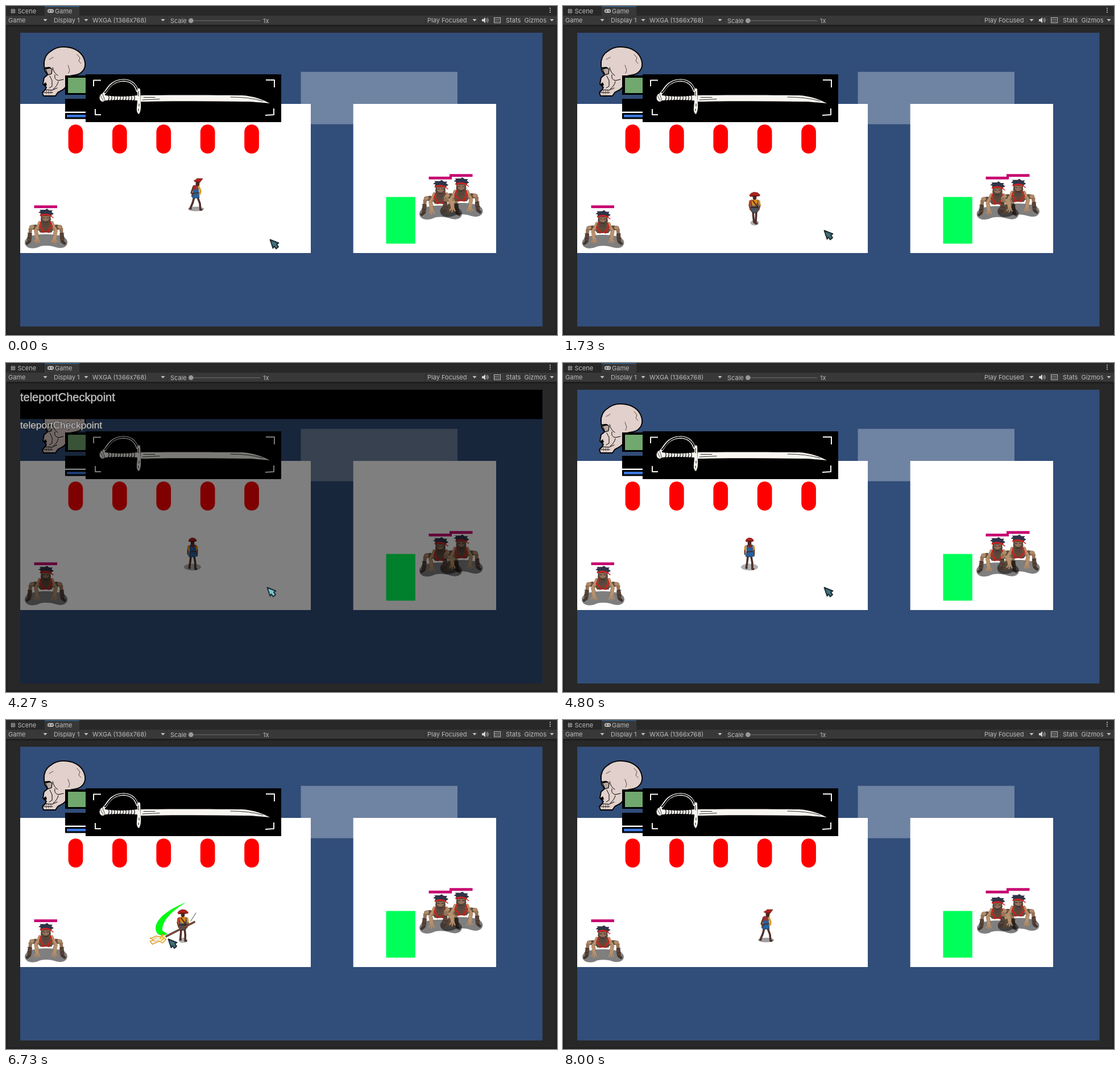
Animation, 969 px wide and 578 px high, one loop 8.07 s. Source, as an HTML page:

```html
<!DOCTYPE html>
<html lang="en">
<head>
<meta charset="utf-8">
<title>Game view</title>
<style>
html, body { margin: 0; width: 100%; height: 100%; overflow: hidden; background: #282828; }
svg { display: block; width: 969px; height: 578px; }
.ui { font: 11px Inter, sans-serif; fill: #bcbcbc; }
.console { font: 17.3px "Liberation Sans", Arial, sans-serif; fill: #c8c8c8; stroke: #3a3a3a; stroke-width: 1.4px; paint-order: stroke; }
#input { font-size: 20px; }
.line { fill: none; stroke-linecap: round; stroke-linejoin: round; }
</style>
</head>
<body>
<svg id="stage" viewBox="0 0 969 578" xmlns="http://www.w3.org/2000/svg"></svg>
<script>
const LOOP = 8070, STEP = 200 / 3;
const OPEN = 37, CLOSE = 72;
const COMMANDS = ['acquire', 'disableur', 'flipswitch', 'health', 'hudfade', 'inventory', 'invincible',
  'openshop', 'rechargegun', 'rechargestamina', 'teleportCheckpoint', 'changescene', 'clearachievements',
  'help', 'log', 'settimescale', 'unlockachievement'];

const rect = (x, y, w, h, fill, more = '') =>
  `<rect x="${x}" y="${y}" width="${w}" height="${h}" fill="${fill}" ${more}/>`;
const shape = (d, fill, more = '') => `<path d="${d}" fill="${fill}" ${more}/>`;
const line = (d, color, width = 1, more = '') =>
  `<path class="line" d="${d}" stroke="${color}" stroke-width="${width}" ${more}/>`;
const oval = (x, y, rx, ry, fill, more = '') =>
  `<ellipse cx="${x}" cy="${y}" rx="${rx}" ry="${ry}" fill="${fill}" ${more}/>`;
const label = (x, y, text) => `<text class="ui" x="${x}" y="${y}">${text}</text>`;
const range = (n, f) => Array.from({ length: n }, (_, i) => f(i)).join('');

function editor() {
  const arrows = [69, 141, 276, 824, 960].map(x => shape(`M${x - 3.5} 23h7l-3.5 4z`, '#c4c4c4')).join('');
  const dividers = [76.5, 148.5, 283.5, 737.5, 831.5, 854.5, 876.5, 907.5]
    .map(x => rect(x - .5, 17, 1, 16, '#303030')).join('');
  return rect(0, 0, 969, 578, '#282828') +
    rect(68, 0, 61, 17, '#383838') + rect(68, 0, 61, 1.5, '#2c5d87') +
    rect(0, 17, 969, 16, '#383838') + rect(0, 33, 969, 1.2, '#1d1d1d') + dividers +
    line('M10.5 5v8M14 5v8M8.5 7.3h8M8.5 10.7h8', '#bcbcbc') +
    rect(73, 5.5, 11, 6.5, '#c4c4c4', 'rx="3.2"') + line('M74.8 8.8h3M76.3 7.3v3', '#383838') + oval(81, 8.8, 1.2, 1.2, '#383838') +
    label(20.5, 12.5, 'Scene') + label(86, 12.5, 'Game') +
    label(4, 29, 'Game') + label(84, 29, 'Display 1') + label(152, 29, 'WXGA (1366x768)') +
    label(289, 29.5, 'Scale') + label(452, 29.5, '1x') + label(741, 29, 'Play Focused') +
    label(879, 29, 'Stats') + label(911.5, 29, 'Gizmos') + arrows +
    rect(321, 25, 126, 1.5, '#5e5e5e') + oval(325.3, 25.8, 4.3, 4.3, '#999') +
    shape('M837 23h2.5l3.5-3v10l-3.5-3H837z', '#d2d2d2') + line('M845 22.5q2 2.5 0 5M846.5 21q3.5 4 0 8', '#c4c4c4') +
    rect(858.5, 20.5, 11, 9, 'none', 'stroke="#bcbcbc"') + line('M860 23.5h9M860 26.5h9', '#c4c4c4', 1.2, 'stroke-dasharray="1 2"') +
    range(3, i => rect(956, 3 + i * 3.5, 1.8, 1.8, '#c4c4c4')) +
    rect(1, 35, 967, 542, 'none', 'stroke="#1c1c1c" stroke-width="3" opacity=".6"');
}

function skull() {
  return shape('M67 104C66 95 70 85 78 80C85 74 95 71 105 72C122 73 134 82 138 95C141 105 138 112 132 117C126 122 118 121 112 123C106 125 107 132 105 142C102 148 95 149 91 152L87 158H66L64 152L69 147L71 143L65 137L67 126L73 121L68 113Z',
      '#e1d0cb', 'stroke="#000" stroke-width="1.8" stroke-linejoin="round"') +
    shape('M69 110l7-2 5 3-1 8-6 2z', '#b9a7a2', 'stroke="#000" stroke-width="1.2"') + shape('M67 108l9-1 4 2-9 2zM66 137l4-3 2 5-3 2z', '#000') +
    line('M82 108q2 10 9 14M77 123l4 8v10l-5 3M86 121q-2 8 6 10l9-2M92 133q-2 8-9 13M69 147l12 1 9-4M66 152h16', '#000', 1) +
    line('M109 104l3 9-2 5M125 85l5 6-2 6 4 4M83 90l-7 4', '#4a3f3d', .9) +
    line('M71 147v8M75 147v8M79 147v7', '#4a3f3d', .8);
}

function sword() {
  const white = '#f8f5f0';
  return rect(140, 120, 344, 84, '#000') +
    line('M154 141V130.5H167M457 130H472V143M157 181V191H167M456 192L471 191V180', white, 2, 'style="stroke-linecap:butt"') +
    line('M172 154C178 150 182 131 207 130.5C222 131 228 139 231 149', white, 4.4) +
    line('M174 152C180 148 184 131 207 130.5C221 131 228 139 231 148', '#000', 2.2, 'stroke-dasharray="2 1.6"') +
    oval(170, 161, 5.5, 7, white) + line('M166 157l5 9M170 155l4 11', '#000', .7) +
    shape('M174 157Q203 161 231 157V166Q203 164 174 166Z', white) +
    range(10, i => line(`M${180 + i * 5} 157q3 5-1 10`, '#000', 1.2)) +
    shape('M231 146q3-3 5 0l1 26q1 11-3 18q-5-2-4-12l1-10z', white) + line('M233 150v8M234 172v4M233 181v3', '#000', 1) +
    shape('M237 157C300 156 370 156.5 415 157C434 158 451 164 464 171C450 170 438 168 420 168C360 167 300 167 237 168Z', white) +
    line('M240 165L270 163.5M242 160.5h20M395 160Q428 160 452 167', '#000', .8);
}

function hud() {
  return skull() + rect(104, 122, 40, 34, '#000') + rect(109, 126, 33, 27, '#70a86e') +
    rect(104, 163, 40, 22.5, '#000') + rect(104, 188, 40, 10.5, '#000') + rect(107, 191, 34, 4.5, '#3c78e0') +
    sword() + range(5, i => rect(109.6 + i * 77.4, 208.3, 25.7, 51, '#f00', 'rx="12.8"'));
}

// Crouching enemy, standing on y = 0
function enemyBody() {
  const half = line('M8-34L18-38L25-37', '#65503f', 8) + line('M24-38L27-34', '#b08d6c', 7) +
    line('M27-33L28-24', '#957459', 6) + line('M28-24L29-15', '#59443a', 7.5) + line('M29-12L33-9', '#46362e', 5) +
    line('M25-26l7-1M26-18l7-1', '#3b302a', 1) + line('M14-33l9-1', '#4a3a30', 1) +
    line('M11-42L18-31L15-16', '#b8916d', 6) + line('M9-41L15-33L12-20', '#8a6a50', 1) +
    line('M13-16l-2 5M15-16l1 6M17-16l3 4', '#b08a68', 2.4);
  return shape('M-37-11C-36-20-24-25 0-25C24-25 38-20 38-11C38-2 28 1 18-2C8-6-8-6-14-2C-25 2-37-1-37-11Z', '#000', 'opacity=".5"') +
    shape('M-12-46L12-46L15-36L10-28H-10L-15-36Z', '#5f493c') +
    half + `<g transform="scale(-1 1)">${half}</g>` +
    line('M-11-46L-13-41M11-46L13-41', '#b8916d', 5) + line('M-8-47L-11-38L-5-33M8-47L11-38L5-33', '#c4251f', 2.6) +
    shape('M-8-33L0-30L8-33L6-27L0-29L-6-27Z', '#b3251f') +
    shape('M-8-60H8L9-50L5-41L0-38L-5-41L-9-50Z', '#57453b') + shape('M-6-57H6L6-51L2-48H-2L-6-51Z', '#92705a') +
    line('M-5-54h3M2-54h3M-3-46h6', '#352a27', 1.2) +
    shape('M-10-58L-9-62L-13-63L-9-66L-11-68L-1-68L2-70L6-67L12-67L10-64L14-61L9-58Z', '#2f3448') +
    line('M-9-58Q0-62 9-57.5', '#d0251f', 2.8) + line('M9-57l4 3', '#d0251f', 1.5);
}

function enemy(x, y) {
  return rect(x - 20.5, y - 75.7, 40.5, 4.8, '#c70070') + `<g class="enemy" data-x="${x}" data-y="${y}">${enemyBody()}</g>`;
}

const hat = shape('M-7 5L-5 2L-1 0L4 1L7 4L7 6L-6 7Z', '#b3201a', 'stroke="#5a1a15" stroke-width=".6"') + line('M-4 6H5', '#5c1914', 1.4);
const sideHat = shape('M-7 4L-3 2L-1 0L9 0L7 3L4 7L-4 6Z', '#b3201a', 'stroke="#5a1a15" stroke-width=".6"') + line('M-3 6H4', '#5c1914', 1.2);
const head = oval(0, 9, 3.4, 4.5, '#4a2922');
const legs = '<path class="line legs" stroke="#50302a" stroke-width="3.6"/>';
const POSES = {
  side: oval(0, 53.5, 14, 4, '#a0a0a0') + legs +
    shape('M-4 12L4 12L5 24L6 34L-5 35L-8 31L-5 24Z', '#28629b', 'stroke="#29282d" stroke-width=".6"') +
    shape('M-6 13L2 11L1 20L-5 19Z', '#ad2923') + line('M5 14L8 22L7 27', '#e59a22', 3.4) + line('M-5 16L-8 25L-5 29', '#65372b', 3) +
    line('M-5 26L5 25', '#4b2a21', 1.6) + `<g transform="translate(3 0)">${head}${sideHat}</g>`,
  front: oval(0, 54, 7.5, 4.5, '#b0b0b0') + legs +
    shape('M-7 14L7 14L6 34L0 37L-6 34Z', '#4a5566', 'stroke="#3b2420" stroke-width=".8"') +
    shape('M-6 13L6 13L3 24L-4 24Z', '#d9861f') + line('M-8 16L-9 23', '#c4431f', 3.4) + line('M8 16L9 23', '#d99428', 3.4) +
    line('M-9 24L-7 31M9 24L7 31', '#71402d', 2.8) + line('M-6 27H6M-3 15L5 26', '#3f241d', 1.8) + head +
    `<g transform="scale(1.3 1.1)">${hat}</g>`,
  back: oval(0, 51.5, 15, 6, '#b0b0b0') + legs +
    shape('M-5 13L6 13L6 24L9 32L3 34L-7 33L-5 24Z', '#275e9b', 'stroke="#252a33" stroke-width=".6"') +
    line('M-7 15L-8 22M7 15L8 21', '#d98a21', 3.4) + line('M-8 23L-8 29M8 22L8 29', '#66392a', 2.6) +
    shape('M-4 12L5 12L3 17L-2 17Z', '#7d2d2b') + line('M-5 25L6 24', '#3e2820', 1.6) + head + hat,
  attack: shape('M-1-9L9 0L5 8H-7L-9-2Z', '#c3c3c3') + oval(0, 59, 4.5, 7, '#bdbdbd') + legs +
    shape('M-9 12L9 12L9 33L0 36L-9 33Z', '#285b8a', 'stroke="#29262b" stroke-width="1"') +
    line('M-8 14L-9 25M8 13L10 18', '#b12a20', 5) + line('M-9 26L-6 32M10 18L13 8', '#6c3c2b', 3.5) +
    shape('M-7 12H7L3 21L-4 20Z', '#a92920') + line('M-8 27H8M-6 16L6 27', '#3f251e', 2) + head + hat
};

const axe = '<g stroke="#d98a10" stroke-width="1.2">' +
  shape('M-13-3L-6-8L-1-4L12-7L15-1L8 0L14 4L2 6L-4 3L-10 8L-8 2Z', '#fbf1cf') + '</g>' +
  line('M-11 1L-5-3M-8 5L-3 0', '#f4bd22', 2) + line('M0-2L9-3M2 2L8 3', '#b5ad99', .8);
const shaft = d => line(d, '#34201a', 3.6) + line(d, '#865135', 2);
const SWINGS = [
  { at: 53, art: shape('M7 44C26 40 56 29 65 6C67-2 54-8 43-3L55 1C60 13 43 29 7 44Z', '#00fb12') +
      shaft('M-11 39L40 13') + `<g transform="translate(50 8)">${axe}</g>` },
  { at: 66, art: shape('M6-13C-20-2-47 13-48 33C-47 44-39 49-27 43L-36 37C-37 20-20 3 6-13Z', '#00fb12') +
      shaft('M20 22L-29 47') + line('M14 20L23 6', '#444', 1) + `<g transform="translate(-43 52) rotate(170)">${axe}</g>` }
];

function world() {
  return rect(25, 47, 918.5, 516, '#314d79') + rect(518.5, 115.7, 275.5, 92, '#fff', 'opacity=".3"') +
    rect(25, 172, 511, 262, '#fff') + rect(610.7, 172, 251.3, 262, '#fff') + rect(668.5, 335.5, 51.3, 82, '#00ff59') +
    hud() + enemy(70, 426) + enemy(764, 375.5) + enemy(800.5, 371) +
    '<g id="player">' + Object.entries(POSES).map(([name, art]) => `<g class="pose" data-name="${name}">${art}</g>`).join('') +
    SWINGS.map(s => `<g class="swing">${s.art}</g>`).join('') + '</g>';
}

const stage = document.getElementById('stage');
stage.innerHTML = editor() + world() +
  `<g id="console">${rect(25, 47, 918.5, 516, '#000', 'opacity=".5"')}${rect(25, 47, 918.5, 51.5, '#000')}
   <text id="input" class="console" x="25" y="67"></text>${rect(25, 48, 1, 25, '#6a6a6a', 'id="caret"')}
   ${range(COMMANDS.length, i => `<text class="console entry" x="25" y="${115 + i * 19.78}"></text>`)}</g>` +
  `<path id="cursor" d="M1 1L16 7L12.500 9L15.500 13.500L11.500 17L8 12.500L6 16Z" stroke="#1a2a30" stroke-width="1.9" stroke-linejoin="round"/>`;

const byId = id => document.getElementById(id);
const all = selector => [...stage.querySelectorAll(selector)];
const parts = { player: byId('player'), console: byId('console'), input: byId('input'), caret: byId('caret'), cursor: byId('cursor'),
  enemies: all('.enemy'), poses: all('.pose'), swings: all('.swing'), legs: all('.legs'), entries: all('.entry') };
const show = (el, on) => el.setAttribute('display', on ? 'inline' : 'none');

// Keys are [game tick, x, y]
const WALK = [[0, 334, 303], [26, 337, 327], [37, 328, 307], [53, 374, 320], [66, 311, 333], [85, 357, 333]];
const POINTER = [[0, 463.5, 409.5], [13, 459, 395], [26, 458.5, 393.5], [37, 458.5, 393.5],
  [53, 462.5, 345], [66, 284.5, 384], [75, 292, 405], [78, 300, 441]];
const STRIDE = { side: 7, back: 6, front: 2, attack: 2 };

function follow(keys, tick) {
  const i = Math.max(1, keys.findIndex(k => k[0] >= tick));
  const [a, b] = [keys[i - 1], keys[i]];
  const p = Math.min(1, (tick - a[0]) / (b[0] - a[0]));
  return [a[1] + (b[1] - a[1]) * p, a[2] + (b[2] - a[2]) * p];
}

function drawConsole(frame) {
  const open = frame >= OPEN && frame < CLOSE;
  show(parts.console, open);
  if (!open) return;
  const typed = frame < 50 || frame >= 68 ? '' : frame < 54 ? 'p' : 'teleportCheckpoint';
  const matches = frame >= 68 ? [] : COMMANDS.filter(c => c.includes(typed));
  parts.input.textContent = typed;
  parts.entries.forEach((el, i) => el.textContent = matches[i] || '');
  parts.caret.setAttribute('x', 25 + (typed ? parts.input.getComputedTextLength() : 0));
  show(parts.caret, frame < 45 || (frame >= 50 && frame < 64) || frame >= 68);
}

function draw(time) {
  const frame = Math.floor((time % LOOP + 4) / STEP);
  const tick = frame < OPEN ? frame : Math.max(OPEN, frame - (CLOSE - OPEN));

  const breath = (1 - Math.cos(2 * Math.PI * tick / 35)) / 2;
  for (const el of parts.enemies)
    el.setAttribute('transform', `translate(${el.dataset.x} ${el.dataset.y}) scale(${1 - .03 * breath} ${1 - .07 * breath})`);

  const [x, y] = follow(WALK, tick);
  parts.player.setAttribute('transform', `translate(${x} ${y})`);
  const swinging = SWINGS.findIndex(s => Math.abs(tick - s.at) < 3);
  const pose = swinging === 0 ? 'attack' : swinging === 1 ? 'front' :
    tick < 14 || tick > 70 ? 'side' : tick < 31 || tick > 57 ? 'front' : 'back';
  parts.poses.forEach(el => show(el, el.dataset.name === pose));
  const stride = Math.cos(2 * Math.PI * tick / 17) * STRIDE[pose];
  const walk = `M-3 33L${-3 - stride * .4} 43L${-3 - stride} 53h1M3 33L${3.5 + stride * .5} 44L${3 + stride * .7} 55h2`;
  parts.legs.forEach(el => el.setAttribute('d', walk));
  parts.swings.forEach((el, i) => {
    show(el, i === swinging);
    el.setAttribute('transform', `rotate(${(tick - SWINGS[i].at) * 14} 0 28)`);
  });

  drawConsole(frame);
  show(parts.cursor, tick <= 78);
  const [cx, cy] = follow(POINTER, Math.min(tick, 78));
  parts.cursor.setAttribute('transform', `translate(${cx} ${cy})`);
  parts.cursor.setAttribute('fill', frame >= OPEN && frame < CLOSE ? '#78c4cd' : '#426f78');
}

const start = performance.now();
function loop() {
  draw(performance.now() - start);
  requestAnimationFrame(loop);
}
loop();
</script>
</body>
</html>
```
